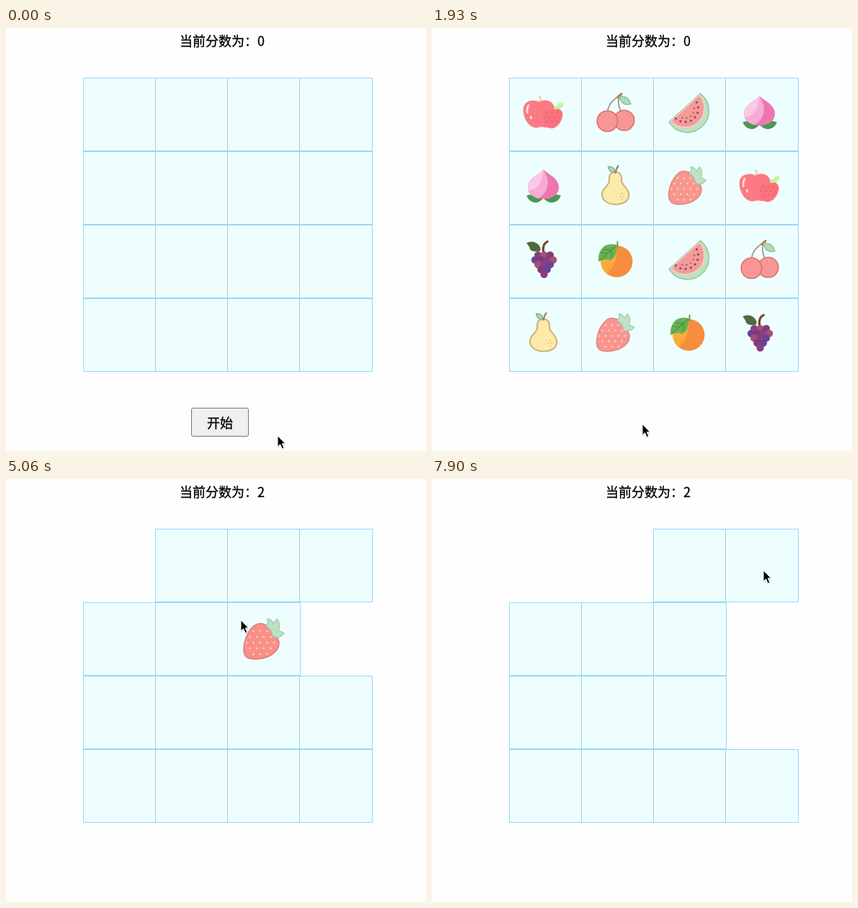
Animation, 583 px wide and 587 px high, one loop 8000 ms. Source, as an HTML page:

```html
<!DOCTYPE html>
<html lang="zh-CN">
<head>
<meta charset="utf-8">
<style>
html, body { margin: 0; width: 100%; height: 100%; overflow: hidden; background: #fefefe; }
svg { display: block; width: 583px; height: 587px; }
text { font: 500 18px "Noto Sans CJK SC", "Noto Sans CJK", sans-serif; stroke: #000; stroke-width: .3px; }
</style>
</head>
<body>
<svg id="stage" viewBox="0 0 583 587"></svg>
<script>
const LOOP = 8000, STEP = 149;
const LEFT = 107, TOP = 69, PITCH_X = 100, PITCH_Y = 102;

const path = (d, fill, stroke = 'none', width = 1.6) =>
  `<path d="${d}" fill="${fill}" stroke="${stroke}" stroke-width="${width}" stroke-linejoin="round" stroke-linecap="round"/>`;
const line = (d, color, width) => path(d, 'none', color, width);
const disc = (x, y, r, fill, stroke = 'none') =>
  `<circle cx="${x}" cy="${y}" r="${r}" fill="${fill}" stroke="${stroke}" stroke-width="1.7"/>`;
const repeat = (count, make) => Array.from({ length: count }, (_, i) => make(i)).join('');

// Staggered dots inside a circle.
function speckle(cx, cy, radius, gap, size, fill) {
  const rows = Math.floor(radius / gap);
  return repeat(2 * rows + 1, i => repeat(2 * rows + 2, j => {
    const dx = (j - rows - (i % 2) / 2) * gap * 1.2, dy = (i - rows) * gap;
    return Math.hypot(dx, dy) <= radius ? disc(cx + dx, cy + dy, size, fill) : '';
  }));
}

function onArc(i, count, radius) {
  const angle = (-28 + 160 * i / (count - 1)) * Math.PI / 180;
  return [26 + radius * Math.cos(angle), 25 + radius * Math.sin(angle)];
}

// Each fruit is drawn in a 60 x 60 box.
const fruits = {
  apple:
    line('M25 15Q27 9 24 7', '#efc68f', 2.4) +
    path('M24 15C30 10 46 11 47 27C47 42 39 54 32 53Q27 51 23 53C11 56 1 43 0 28C-1 12 16 10 24 15Z', '#ff717a') +
    line('M8 20Q5 25 6 31M11 37L12 39', '#ffd8dc', 3) +
    path('M47 26C54 23 60 29 58 37C56 46 50 53 43 54C34 54 27 47 28 37C28 27 38 23 47 26Z', '#fc6875', '#ff7f88', 1) +
    speckle(43, 38, 11, 6, 1, '#e5505f') +
    path('M46 26Q45 19 51 20Q55 14 60 17Q59 24 54 25Z', '#c5f394'),
  cherry:
    line('M36 6Q19 15 18 31M36 6Q32 17 38 29', '#a58d79', 2) +
    line('M33 8L39 3', '#a97c50', 3.4) +
    path('M36 7Q49 5 53 18Q39 22 36 7Z', '#b0d9b4', '#82ad88', 1.3) +
    disc(43, 42.5, 15, '#f98f8f', '#d86669') + disc(18, 43.5, 15.3, '#f98f8f', '#d86669'),
  melon:
    path('M49 2.6A32 32 0 1 1 2.6 45Z', '#b9dfbd', '#94bf9b') +
    path('M47.5 5A27.5 27.5 0 0 1 5.5 43.5Z', '#f99191', '#efd0c4', 1.6) +
    repeat(8, i => disc(...onArc(i, 8, 20), 1.6, '#5d4548')) +
    repeat(5, i => disc(...onArc(i + 1, 7, 14), 1.2, '#76545a')),
  peach:
    path('M5 45Q17 40 29 50Q21 58 13 54Q8 52 5 45ZM56 45Q44 40 31 50Q39 58 48 54Q53 52 56 45Z', '#3f9147') +
    path('M30 6C36 13 53 18 53 33C53 43 43 50 30 50C17 50 7 43 7 33C7 18 25 13 30 6Z', '#f06cad') +
    path('M30 6Q33 12 36 19C39 34 31 45 22 49C13 46 7 41 7 33C7 18 25 13 30 6Z', '#f8a6d3') +
    path('M30 6Q30 15 25 26Q18 38 7 37C5 18 25 13 30 6Z', '#fac7e5'),
  pear:
    path('M30 10C38 10 40 17 39 23C40 30 50 34 50 44C50 54 40 58 30 58C20 58 10 53 10 43C10 34 20 31 21 23C20 16 22 10 30 10Z', '#fde9a3', '#caac70', 2.2) +
    line('M30 11Q31 5 34 1', '#94795a', 2.5) +
    path('M29 10Q20 11 19 2Q29 1 29 10Z', '#a9d5b0', '#749e7d', 1.3) +
    speckle(40, 46, 5, 4, .9, '#cbaa63'),
  strawberry:
    path('M17 11Q25 6 34 11Q48 23 51 34Q52 46 37 54Q22 60 10 57Q1 55 2 41Q5 20 17 11Z', '#f98e8b', '#dd7a77', 1.4) +
    speckle(25, 35, 21, 8, 1.5, '#fbd18f') +
    path('M33 12Q37 8 35 2Q42 3 43 9L48 2Q54 10 50 18L58 22Q51 31 42 26Q42 18 33 12Z', '#bbe2c3', '#9ac7a4', 1.2),
  grape:
    line('M30 20Q28 8 36 4', '#6e3b23', 3.5) +
    path('M5 6Q15 1 23 9Q27 14 25 18Q10 21 9 12Z', '#40622f') +
    repeat(5, row => {
      const count = row ? 5 - row : 3;
      return repeat(count, k => disc(31 + (k - (count - 1) / 2) * 9, 24 + row * 7.2, 5.5,
        ['#85307a', '#7c2c72', '#a0446f', '#633590'][(row * 3 + k * 2 + (k >> 1)) % 4]));
    }),
  orange:
    disc(32, 33.5, 23.5, '#f78632') +
    path('M32 10Q34 36 17 52A23.5 23.5 0 0 1 32 10Z', '#fca62d') +
    speckle(22, 43, 6, 4, .8, '#dc7d24') +
    line('M33 12V4', '#4d8a35', 1.8) +
    path('M32 9Q33 27 22 32Q14 28 5 34Q3 21 12 12Q20 6 32 9Z', '#60ad48') +
    line('M31 10L8 31M24 16H12M19 21H8M24 17V27', '#3f8435', 1.2)
};

const board = ('apple cherry melon peach peach pear strawberry apple ' +
  'grape orange melon cherry pear strawberry orange grape').split(' ');

function cellMarkup(name, i) {
  const x = LEFT + i % 4 * PITCH_X, y = TOP + (i >> 2) * PITCH_Y;
  return `<g class="cell" transform="translate(${x} ${y})">` +
    '<rect x=".5" y=".5" width="101" height="101" fill="#eefefe" stroke="#92d8ff"/>' +
    (i % 4 ? '<path class="seam" d="M.5 1v100" stroke="#a8cbd5"/>' : '') +
    `<g transform="translate(1 1)"><g class="fruit"><g transform="translate(20 20)">${fruits[name]}</g></g></g></g>`;
}

const stage = document.getElementById('stage');
stage.innerHTML =
  '<text id="score" x="241" y="24.5"></text>' + board.map(cellMarkup).join('') +
  '<g id="start"><rect id="face" x="257.5" y="527.5" width="79" height="39" rx="2.5"/><text x="279" y="555">开始</text></g>' +
  '<g id="cursor">' + path('M0 2V17L4 14L6 19L9 18L7 13H11Z', '#0002') +
  path('M0 0V15L3.6 11.8L6.2 17.8L8.8 16.7L6.3 10.8H10.5Z', '#000', '#fff', 1) + '</g>';

const [score, start, face, cursor] = ['score', 'start', 'face', 'cursor'].map(id => document.getElementById(id));
const cells = [...stage.querySelectorAll('.cell')].map(node => ({
  node, fruit: node.querySelector('.fruit'), seam: node.querySelector('.seam')
}));
const show = (node, on) => node.setAttribute('visibility', on ? 'inherit' : 'hidden');
const clamp = p => Math.min(1, Math.max(0, p));
const swing = p => .5 - Math.cos(Math.PI * clamp(p)) / 2;

// The pointer rests at a spot until the next move departs.
const moves = [
  { depart: 0, arrive: 447, x: 292, y: 550 },
  { depart: 2235, arrive: 2384, x: 311, y: 552 },
  { depart: 2384, arrive: 3129, x: 157, y: 131 },
  { depart: 3278, arrive: 3725, x: 440, y: 225 },
  { depart: 3725, arrive: 4470, x: 350, y: 243 },
  { depart: 4917, arrive: 5066, x: 326, y: 196 },
  { depart: 5066, arrive: 5215, x: 259, y: 131 },
  { depart: 5662, arrive: 6407, x: 470, y: 333 },
  { depart: 6556, arrive: 6705, x: 423, y: 186 },
  { depart: 6705, arrive: 7152, x: 262, y: 130 },
  { depart: 7301, arrive: 7897, x: 460, y: 127 }
];
function cursorAt(t) {
  let x = 377, y = 566;
  for (const move of moves) {
    const p = clamp((t - move.depart) / (move.arrive - move.depart));
    x += (move.x - x) * p;
    y += (move.y - y) * p;
  }
  return [x, y];
}

const PRESS_START = 740, PREVIEW = 770, FADE = 1000, COMPARE_DELAY = 430;
const clicks = [3120, 3720, 5010, 5500, 6400, 7290].map(at => {
  const [x, y] = cursorAt(at);
  return { at, cell: Math.floor((x - LEFT) / PITCH_X) + 4 * Math.floor((y - TOP) / PITCH_Y) };
});

// Two clicks make a turn: a pair is removed for +2, a miss closes for -2.
function gameAt(t) {
  const open = new Set(), removed = new Set();
  let points = 0;
  for (let i = 0; i < clicks.length; i += 2) {
    const turn = clicks.slice(i, i + 2);
    if (t < turn[1].at + COMPARE_DELAY) {
      turn.filter(c => t >= c.at).forEach(c => open.add(c.cell));
      break;
    }
    const match = board[turn[0].cell] === board[turn[1].cell];
    points += match ? 2 : -2;
    if (match) turn.forEach(c => removed.add(c.cell));
  }
  return { open, removed, points };
}

function draw(t) {
  const [x, y] = cursorAt(t);
  cursor.setAttribute('transform', `translate(${x} ${y})`);

  const hover = x < 337 && y < 567;
  face.setAttribute('fill', hover ? '#e5e5e5' : '#efefef');
  face.setAttribute('stroke', hover ? '#4f4f4f' : '#767676');
  show(start, t < PRESS_START);

  const { open, removed, points } = gameAt(t);
  score.textContent = '当前分数为：' + points;

  const preview = swing((t - PREVIEW) / FADE) - swing((t - PREVIEW - FADE) / FADE);
  cells.forEach(({ node, fruit, seam }, i) => {
    const size = open.has(i) ? 1 : preview;
    show(node, !removed.has(i));
    show(fruit, size > .001);
    fruit.setAttribute('transform', `scale(${size})`);
    fruit.setAttribute('opacity', size);
    if (seam) show(seam, !removed.has(i - 1));
  });
}

// The screen is refreshed at a fixed, coarse rate.
function tick() {
  const t = performance.now() % LOOP;
  draw(Math.floor((t + 8) / STEP) * STEP);
  requestAnimationFrame(tick);
}
tick();
</script>
</body>
</html>
```
